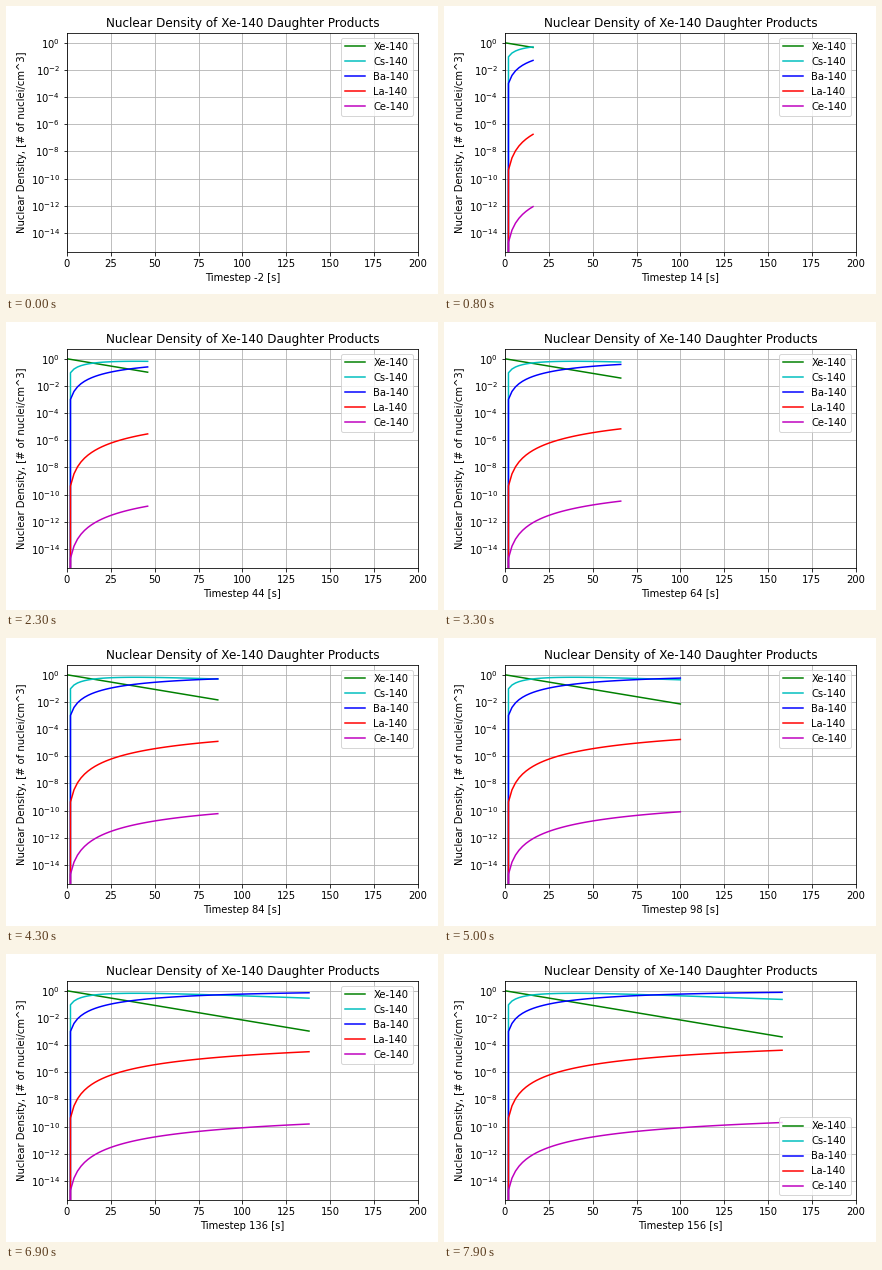
Animation of 432x288 px, one loop 8 s. Source, as a matplotlib script:

```python
import numpy as np
import matplotlib.pyplot as plt
from matplotlib.animation import FuncAnimation

DT = 2        # seconds per frame
FRAMES = 80

# Decay constants [1/s] of the chain Xe -> Cs -> Ba -> La -> Ce
half_lives = np.array([14, 64, 12.75 * 86400, 1.678 * 86400])
k_xe, k_cs, k_ba, k_la = np.log(2) / half_lives

t = np.arange(0, FRAMES * DT, DT, dtype=float)
xe = np.exp(-k_xe * t)
cs = k_xe / (k_xe - k_cs) * (np.exp(-k_cs * t) - xe)
ba = 1 - xe - cs
# La grows from the time integral of Ba, which barely decays here
la = k_ba * (t - (1 - xe) / k_xe
             - k_xe / (k_xe - k_cs)
             * ((1 - np.exp(-k_cs * t)) / k_cs - (1 - xe) / k_xe))
ce = k_la * la
for density in (cs, ba, la, ce):
    density[0] = 0

series = [("Xe-140", "g", xe), ("Cs-140", "c", cs), ("Ba-140", "b", ba),
          ("La-140", "r", la), ("Ce-140", "m", ce)]

plt.rcParams.update({"font.family": "DejaVu Sans", "font.size": 10})
fig, ax = plt.subplots(figsize=(6, 4), dpi=72)
ax.set_title("Nuclear Density of Xe-140 Daughter Products", fontsize=12)
ax.set_ylabel("Nuclear Density, [# of nuclei/cm^3]")
ax.set_xlabel("Timestep -2 [s]")
ax.set_yscale("log")
ax.set_xlim(0, 200)
low = np.log10(ce[1])
ax.set_ylim(10 ** (1.05 * low), 10 ** (-0.05 * low))
ax.set_yticks([10.0 ** e for e in range(-14, 1, 2)])
ax.minorticks_off()
ax.grid(True)

lines = [ax.plot([], [], color, label=name)[0] for name, color, _ in series]
ax.legend(loc="best")
fig.tight_layout()


def update(i):
    for line, (_, _, density) in zip(lines, series):
        line.set_data(t[:i + 1], density[:i + 1])
    ax.set_xlabel(f"Timestep {DT * (i - 1)} [s]")
    return lines


anim = FuncAnimation(fig, update, frames=FRAMES, interval=100, repeat=True)
plt.show()
```
